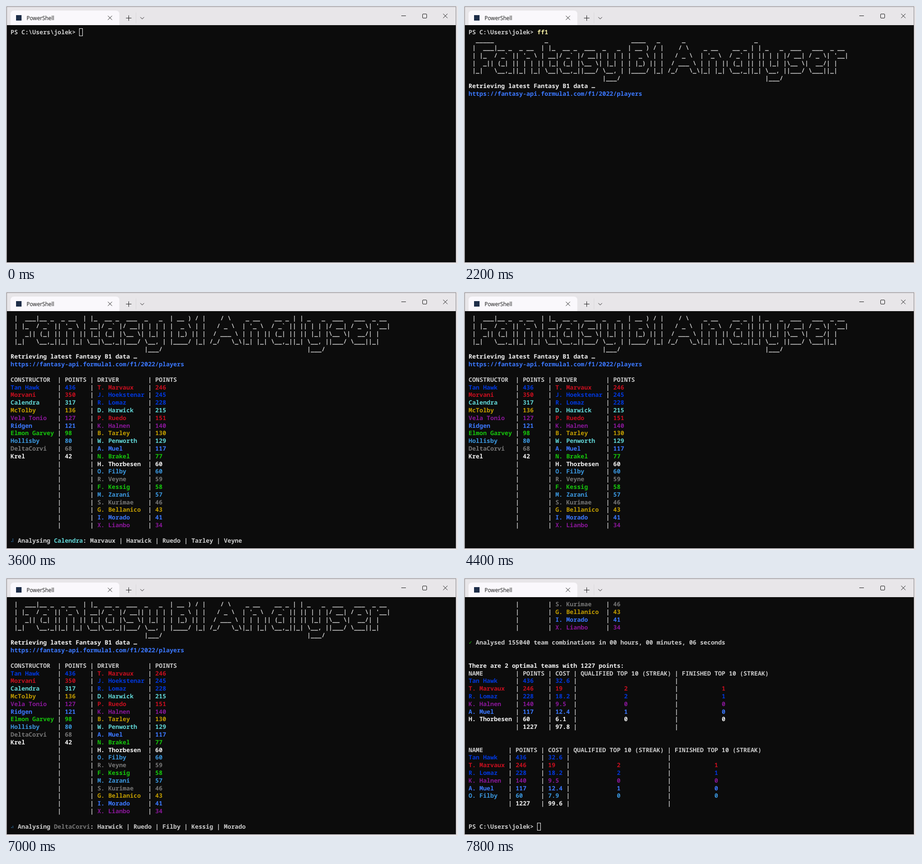
An HTML page for the animation above (8 s loop, 989 by 566 pixels).

```html
<!DOCTYPE html>
<html lang="en">
<head>
<meta charset="utf-8">
<title>PowerShell</title>
<style>
  html, body { margin: 0; width: 100%; height: 100%; overflow: hidden; background: #e6e4e7; }
  svg { position: absolute; left: 0; top: 0; }
  pre { margin: 0; }
  #screen {
    position: absolute; left: 10px; top: 49.4px; color: #ccc;
    font: 600 13.2px/16.8px "Noto Sans Mono", "DejaVu Sans Mono", monospace;
    font-variant-ligatures: none; text-rendering: geometricPrecision;
  }
  .cursor { position: absolute; box-sizing: border-box; width: 8px; height: 17px; border: 1px solid #fff; }
  .mark { position: absolute; font: 10px/19px "DejaVu Sans", sans-serif; }
  .title { font: 11.7px "Open Sans", "Noto Sans", sans-serif; }
</style>
</head>
<body>
<svg width="989" height="566" fill="none" stroke="#1a1a1a">
  <rect x="1.5" y="1.5" width="983" height="561" fill="#0c0c0c" stroke="#858387"/>
  <path d="M2 2H984V42H2Z" fill="#e8e6e9" stroke="none"/>
  <path d="M10 42V18Q10 10 18 10H240Q248 10 248 18V42Z" fill="#faf8fc" stroke="none"/>
  <rect x="22" y="20" width="12" height="12" fill="#1d2d48" stroke="none"/>
  <text class="title" x="45" y="30.5" fill="#111" stroke="none">PowerShell</text>
  <path d="M223 21.5l9 9m0-9l-9 9M262.5 26.5h12m-6-6v12M294 24.5l4 4l4-4"/>
  <path d="M284.5 14v24" stroke="#d9d7da"/>
  <path d="M865 21.5h10M956.5 17l9.5 9.5m0-9.5l-9.5 9.5"/>
  <rect x="911.5" y="17.5" width="9" height="9" rx="1.5"/>
</svg>
<pre id="screen"></pre>
<pre id="banner" hidden>
  _____              _                       ____   _      _                   _
 |  ___|__ _  _ __  | |_  __ _  ___  _   _  | __ ) / |    / \    _ __    __ _ | | _   _  ___   ___  _ __
 | |_  / _` || '_ \ | __|/ _` |/ __|| | | | |  _ \ | |   / _ \  | '_ \  / _` || || | | |/ __| / _ \| '__|
 |  _|| (_| || | | || |_| (_| |\__ \| |_| | | |_) || |  / ___ \ | | | || (_| || || |_| |\__ \|  __/| |
 |_|   \__,_||_| |_| \__|\__,_||___/ \__, | |____/ |_| /_/   \_\|_| |_| \__,_||_| \__, ||___/ \___||_|</pre>
<script>
const LOOP = 8000, TICK = 200, ROWS = 30;
const WHITE = '#f2f2f2', BLUE = '#3b78ff';

// name, points, colour, points by driver
const teams = [
  ['Tan Hawk', 436, '#0037da', { 'J. Hoekstenar': 245, 'R. Lomaz': 228 }],
  ['Morvani', 350, '#c50f1f', { 'T. Marvaux': 246, 'P. Ruedo': 151 }],
  ['Calendra', 317, '#61d6d6', { 'D. Harwick': 215, 'W. Penworth': 129 }],
  ['McTolby', 136, '#c19c00', { 'B. Tarley': 130, 'G. Bellanico': 43 }],
  ['Vela Tonio', 127, '#881798', { 'K. Halnen': 140, 'X. Lianbo': 34 }],
  ['Ridgen', 121, BLUE, { 'A. Muel': 117, 'I. Morado': 41 }],
  ['Elmon Garvey', 98, '#16c60c', { 'N. Brakel': 77, 'F. Kessig': 58 }],
  ['Hollisby', 80, '#3a96dd', { 'O. Filby': 60, 'M. Zarani': 57 }],
  ['DeltaCorvi', 68, '#767676', { 'R. Veyne': 59, 'S. Kurimae': 46 }],
  ['Krel', 42, WHITE, { 'H. Thorbesen': 60, 'E. Kleinhofer': 0 }]
];
const drivers = teams
  .flatMap(([, , color, pair]) => Object.entries(pair).map(([name, points]) => ({ name, points, color })))
  .sort((a, b) => b.points - a.points || a.name.localeCompare(b.name));

const paint = (text, color, weight = 600) =>
  `<span style="color:${color};font-weight:${weight}">${text}</span>`;
const mark = (glyph, color) => `<span class="mark" style="color:${color}">${glyph}</span>  `;
const cell = (text, width, color = '#ccc') => paint(String(text).padEnd(width), color);

const cursor = '<span class="cursor"></span>';
const prompt = 'PS C:\\Users\\jolek&gt; ';
const command = n => prompt + paint('ff1'.slice(0, n), '#f9f1a5');

const banner = [
  ...document.getElementById('banner').textContent.split('\n'),
  ' '.repeat(37) + '|___/' + ' '.repeat(40) + '|___/'
];
const intro = [command(3), ...banner.map(line => paint(line, '#ccc', 700))];
const fetching = [...intro, paint('Retrieving latest Fantasy B1 data …', WHITE, 700)];
const fetched = [...fetching, paint('https://fantasy-api.formula1.com/f1/2022/players', BLUE)];
const standings = [
  ...fetched, '',
  'CONSTRUCTOR  | POINTS | DRIVER        | POINTS',
  ...drivers.filter(d => d.points).map(({ name, points, color }, i) => {
    const [tName, tPoints, tColor] = teams[i] || ['', ''];
    return [cell(tName, 12, tColor), cell(tPoints, 6, tColor), cell(name, 13, color), cell(points, 6, color)].join(' | ');
  }), ''
];

// Every team is tried with all five-driver combinations in lexicographic order.
const PICKS = 5;
const choose = (n, k) => k ? choose(n - 1, k - 1) * n / k : 1;
const perTeam = choose(drivers.length, PICKS);

function combination(rank) {
  const picks = [];
  for (let i = 0; picks.length < PICKS; i++) {
    const count = choose(drivers.length - 1 - i, PICKS - 1 - picks.length);
    if (rank < count) picks.push(drivers[i].name.slice(3));
    else rank -= count;
  }
  return picks;
}

// time, combinations tried so far
const progress = [[2600, 3454], [5400, 84849], [7000, 133729], [7700, 155040]];
const pauses = [[3000, 3400], [3600, 4000], [5000, 5400], [5600, 6600]];

function tried(t) {
  const i = progress.findLastIndex(p => p[0] <= t);
  const [[t0, n0], [t1, n1]] = progress.slice(i, i + 2);
  return Math.floor(n0 + (n1 - n0) * (t - t0) / (t1 - t0));
}

function analysing(t) {
  if (t === 4400) return [...standings, ''];
  const pause = pauses.find(([from, to]) => t >= from && t < to);
  if (pause) t = pause[0];
  const n = tried(t);
  const [name, , color] = teams[Math.floor(n / perTeam)];
  const glyph = '⠋⠙⠹⠸⠼⠴⠦⠧⠇⠏'[Math.floor((t - 2120) / 320) % 10];
  return [...standings, mark(glyph, '#3a96dd') + 'Analysing ' + paint(name, color) + ': ' +
    combination(n % perTeam).join(' | ')];
}

// picks: driver rank, cost, qualifying streak, finishing streak
function teamTable(width, total, picks) {
  const row = (color, name, points, cost, qualified = '', finished = '') => [
    cell(name, width, color), cell(points, 6, color), cell(cost, 4, color),
    cell(' '.repeat(12) + qualified, 25, color), cell(' '.repeat(11) + finished, 24, color)
  ].join(' | ');
  const [name, points, color] = teams[0];
  return [
    'NAME'.padEnd(width) + ' | POINTS | COST | QUALIFIED TOP 10 (STREAK) | FINISHED TOP 10 (STREAK)',
    row(color, name, points, 32.6),
    ...picks.map(([i, ...rest]) => row(drivers[i].color, drivers[i].name, drivers[i].points, ...rest)),
    row(WHITE, '', 1227, total), '', ''
  ];
}
const shared = [[0, 19, 2, 1], [2, 18.2, 2, 1], [5, 9.5, 0, 0], [8, 12.4, 1, 0]];
const result = [
  ...standings,
  mark('✓', '#16c60c') + `Analysed ${perTeam * teams.length} team combinations in 00 hours, 00 minutes, 06 seconds`,
  '', '',
  paint('There are 2 optimal teams with 1227 points:', WHITE, 700),
  ...teamTable(12, 97.8, [...shared, [10, 6.1, 0, 0]]),
  ...teamTable(10, 99.6, [...shared, [11, 7.9, 0, 0]]),
  prompt + cursor
];

// start time, lines on screen at a time
const steps = [
  ...[0, 600, 800, 1200].map((start, n) => [start, () => [command(n) + cursor]]),
  [1800, () => intro],
  [2000, () => fetching],
  [2200, () => fetched],
  [2400, () => standings],
  [2600, analysing],
  [7800, () => result]
];

const screen = document.getElementById('screen');
let shown;
function draw() {
  const t = Math.floor(performance.now() % LOOP / TICK) * TICK;
  if (t !== shown) {
    shown = t;
    const [, lines] = steps.findLast(s => s[0] <= t);
    screen.innerHTML = lines(t).slice(-ROWS).join('\n');
  }
  requestAnimationFrame(draw);
}
draw();
</script>
</body>
</html>
```
